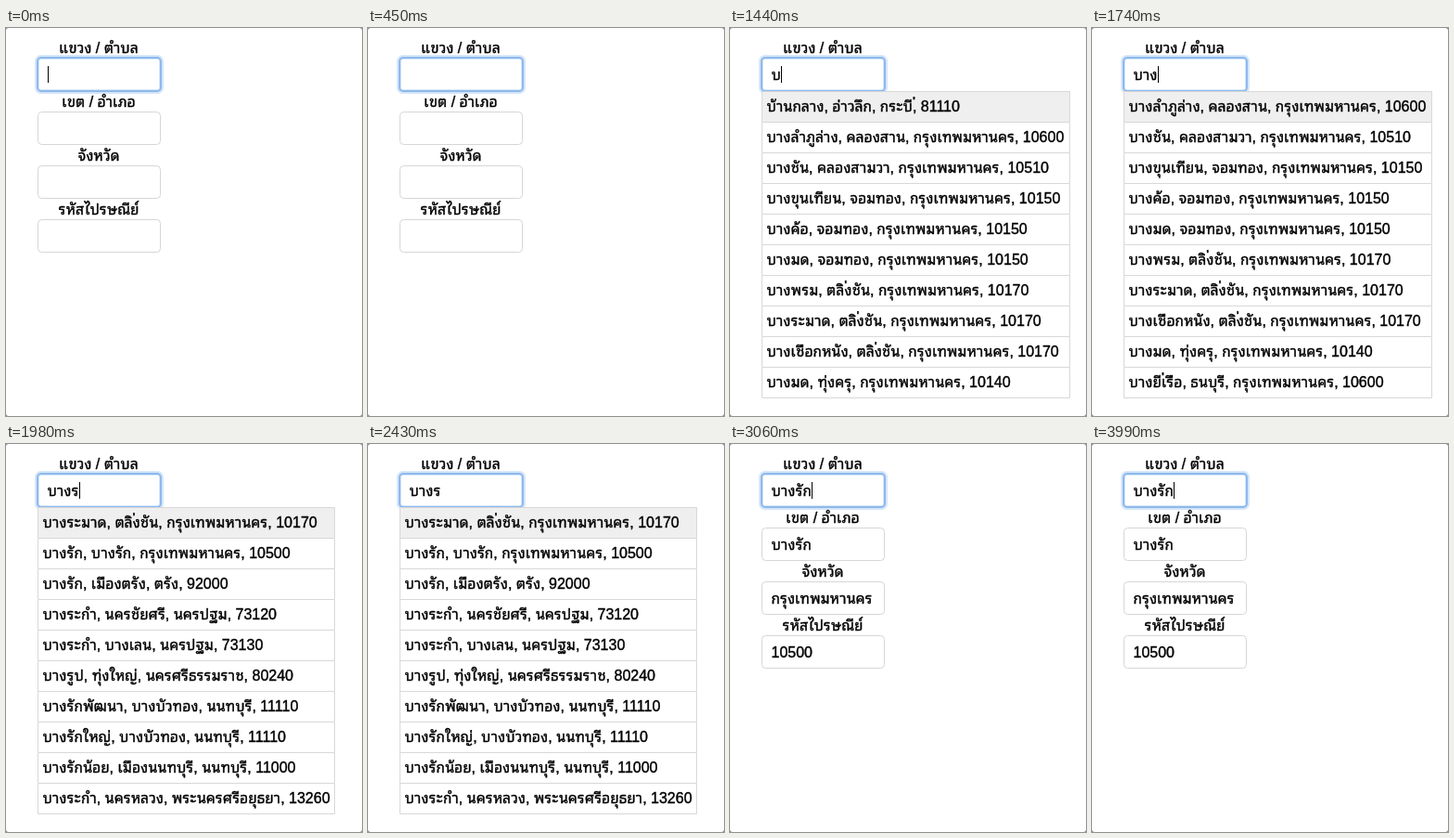
Animation of 384x418 px, one loop 4.38 s. Source, as an HTML page with a canvas:

```html
<!DOCTYPE html>
<html lang="th">
<head>
<meta charset="utf-8">
<title>Thai address autocomplete</title>
<style>
html, body { margin: 0; width: 384px; height: 418px; overflow: hidden; background: #fff; }
canvas { display: block; width: 384px; height: 418px; }
</style>
</head>
<body>
<canvas></canvas>
<script>
const W = 384, H = 418, LOOP = 4380;
const FONTS = '"Liberation Sans", "Noto Sans Thai Looped", "Noto Looped Thai", "Noto Sans Thai", "Noto Sans", sans-serif';
const BANGKOK = 'กรุงเทพมหานคร';
const LABELS = ['แขวง / ตำบล', 'เขต / อำเภอ', 'จังหวัด', 'รหัสไปรษณีย์'];
const CHOSEN = ['บางรัก', 'บางรัก', BANGKOK, '10500'];

const inBangkok = rows => rows.map(([place, code]) => `${place}, ${BANGKOK}, ${code}`);

const bang = inBangkok([
  ['บางลำภูล่าง, คลองสาน', 10600],
  ['บางชัน, คลองสามวา', 10510],
  ['บางขุนเทียน, จอมทอง', 10150],
  ['บางค้อ, จอมทอง', 10150],
  ['บางมด, จอมทอง', 10150],
  ['บางพรม, ตลิ่งชัน', 10170],
  ['บางระมาด, ตลิ่งชัน', 10170],
  ['บางเชือกหนัง, ตลิ่งชัน', 10170],
  ['บางมด, ทุ่งครุ', 10140],
  ['บางยี่เรือ, ธนบุรี', 10600]
]);
const lists = {
  b: { width: 333, rows: ['บ้านกลาง, อ่าวลึก, กระบี่, 81110', ...bang.slice(0, 9)] },
  bang: { width: 333, rows: bang },
  bangR: {
    width: 321,
    rows: [
      ...inBangkok([['บางระมาด, ตลิ่งชัน', 10170], ['บางรัก, บางรัก', 10500]]),
      'บางรัก, เมืองตรัง, ตรัง, 92000',
      'บางระกำ, นครชัยศรี, นครปฐม, 73120',
      'บางระกำ, บางเลน, นครปฐม, 73130',
      'บางรูป, ทุ่งใหญ่, นครศรีธรรมราช, 80240',
      'บางรักพัฒนา, บางบัวทอง, นนทบุรี, 11110',
      'บางรักใหญ่, บางบัวทอง, นนทบุรี, 11110',
      'บางรักน้อย, เมืองนนทบุรี, นนทบุรี, 11000',
      'บางระกำ, นครหลวง, พระนครศรีอยุธยา, 13260'
    ]
  }
};

// Start time, field values, caret shown, open list, highlighted row
const steps = [
  [0, [], true],
  [450, [], false],
  [900, [], true],
  [1350, [], false],
  [1440, ['บ'], true, 'b', 0],
  [1620, ['บา'], true, 'bang', 0],
  [1740, ['บาง'], true, 'bang', 0],
  [1980, ['บางร'], true, 'bangR', 0],
  [2430, ['บางร'], false, 'bangR', 0],
  [2790, ['บางร'], false, 'bangR', 1],
  [2880, ['บางร'], true, 'bangR', 1],
  [3060, CHOSEN, true],
  [3510, CHOSEN, false],
  [3990, CHOSEN, true]
];

const canvas = document.querySelector('canvas');
const ctx = canvas.getContext('2d');
const ratio = window.devicePixelRatio || 1;
canvas.width = W * ratio;
canvas.height = H * ratio;
ctx.scale(ratio, ratio);

// Thai letters are sized to sit evenly beside 16px Latin digits
ctx.font = `16px ${FONTS}`;
const thaiSize = 16 * 250 / ctx.measureText('บางลำภูล่างคลองสาน' + BANGKOK).width;

// A tone mark over an upper vowel is its own run, so that it can be raised
const RUNS = /(?<=[\u0e31\u0e34-\u0e37])[\u0e48-\u0e4b]|(?:(?<![\u0e31\u0e34-\u0e37])[\u0e48-\u0e4b]|[\u0e00-\u0e47\u0e4c-\u0e7f])+|[^\u0e00-\u0e7f]+/g;

function eachRun(text, visit) {
  let x = 0;
  for (const run of text.match(RUNS) || []) {
    ctx.font = `${run >= '\u0e00' ? thaiSize : 16}px ${FONTS}`;
    visit(run, x);
    x += ctx.measureText(run).width;
  }
  return x;
}
const textWidth = text => eachRun(text, () => {});

function drawText(text, x, y) {
  ctx.fillStyle = ctx.strokeStyle = '#000';
  ctx.lineWidth = 0.4;
  ctx.lineJoin = 'round';
  return eachRun(text, (run, dx) => {
    const lift = /^[\u0e48-\u0e4b]/.test(run) ? thaiSize * 0.2 : 0;
    ctx.fillText(run, x + dx, y - lift);
    ctx.strokeText(run, x + dx, y - lift);
  });
}

function box(x, y, w, h, radius, color, lineWidth = 1) {
  ctx.beginPath();
  ctx.roundRect(x, y, w, h, radius);
  ctx.strokeStyle = color;
  ctx.lineWidth = lineWidth;
  ctx.stroke();
}

function drawField(i, value, caret) {
  const y = 32 + 58 * i;
  drawText(LABELS[i], 100 - textWidth(LABELS[i]) / 2, y - 5);
  if (i === 0) {
    box(33.5, y - 0.5, 134, 37, 4, 'rgba(120, 172, 236, 0.3)', 5);
    box(34, y, 133, 36, 4, '#8db9ec', 2);
  } else {
    box(34.5, y + 0.5, 132, 35, 4, '#d6d6d6');
  }
  const end = 44.5 + drawText(value, 44.5, y + 24);
  if (caret) ctx.fillRect(Math.round(end), y + 9, 1, 18);
}

function drawList({ width, rows }, active) {
  ctx.fillStyle = '#fff';
  ctx.fillRect(34, 68, width, H - 72);
  rows.forEach((row, i) => {
    const y = 68 + 33 * i;
    ctx.fillStyle = i === active ? '#efefef' : '#fff';
    ctx.fillRect(34, y, width, 33);
    box(34.5, y + 0.5, width - 1, 33, 0, '#d8d8d8');
    drawText(row, 39.5, y + 22);
  });
}

function draw(time) {
  const [, values, caret, list, active] = steps.findLast(step => step[0] <= time);
  ctx.fillStyle = '#888';
  ctx.fillRect(0, 0, W, H);
  ctx.fillStyle = '#fff';
  ctx.beginPath();
  ctx.roundRect(0, 0, W, H, 3);
  ctx.fill();
  const visible = list ? 1 : LABELS.length;
  for (let i = 0; i < visible; i++) drawField(i, values[i] || '', caret && i === 0);
  if (list) drawList(lists[list], active);
}

const start = performance.now();
function tick() {
  draw((performance.now() - start) % LOOP);
  requestAnimationFrame(tick);
}
tick();
</script>
</body>
</html>
```
